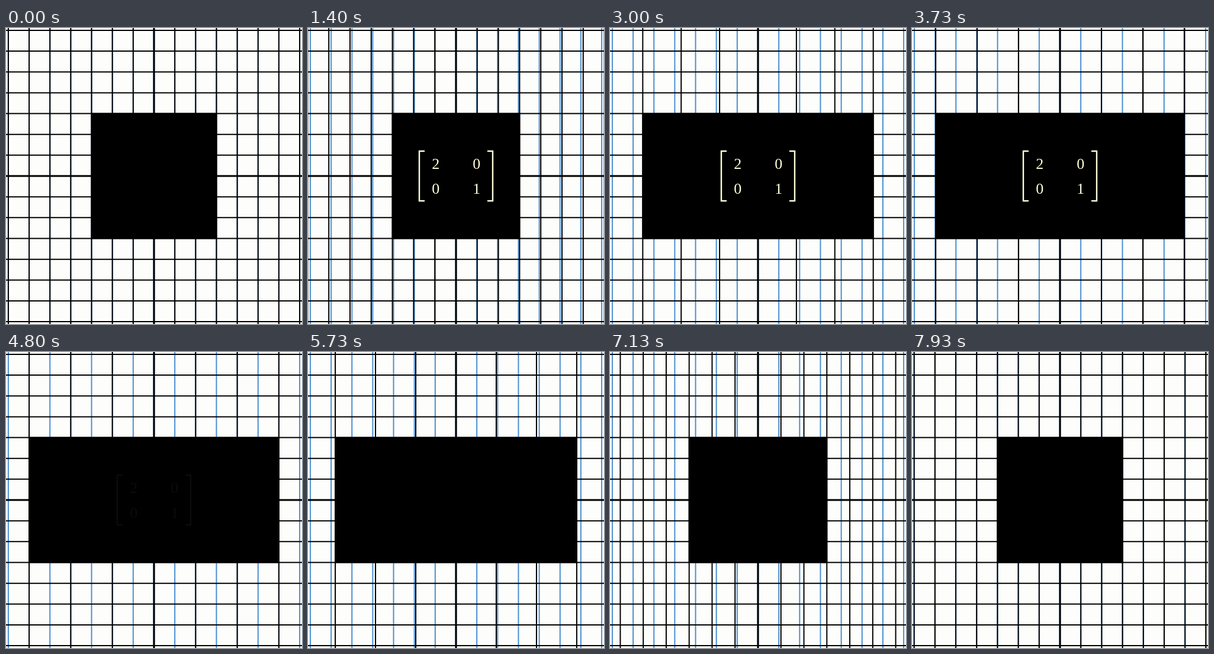
These frames come from a looping animation (500 px wide and 500 px high, 8 s). An HTML page with a canvas:

```html
<!DOCTYPE html>
<html lang="en">
<head>
<meta charset="utf-8">
<title>Horizontal stretch</title>
<style>
html, body { margin: 0; height: 100%; overflow: hidden; background: #fdfdfb; }
canvas { display: block; }
</style>
</head>
<body>
<canvas id="stage" width="500" height="500"></canvas>
<script>
const ctx = document.getElementById('stage').getContext('2d');
const SIZE = 500, MID = SIZE / 2, UNIT = SIZE * 9 / 128;
const LOOP = 8000, FPS = 15;
const PAPER = '#fdfdfb', BLUE = '#4a8fd0', INK = '#000', CREAM = '#ffffd8';

// Normalised logistic easing, clamped to 0..1
const logistic = x => 1 / (1 + Math.exp(-x));
const EDGE = logistic(-5);
function smooth(t) {
  const p = (logistic(10 * (t - 0.5)) - EDGE) / (1 - 2 * EDGE);
  return Math.min(1, Math.max(0, p));
}
const ramp = (time, start, length) =>
  smooth(Math.min(1, Math.max(0, (time - start) / length)));

function line(points, color, width) {
  ctx.strokeStyle = color;
  ctx.lineWidth = width;
  ctx.beginPath();
  points.forEach(([x, y]) => ctx.lineTo(x, y));
  ctx.stroke();
}

function gridLines(color, stretch, vertical) {
  for (let i = -7; i <= 7; i++) {
    const p = MID + i * UNIT * stretch;
    const ends = vertical ? [[p, 0], [p, SIZE]] : [[0, p], [SIZE, p]];
    line(ends, color, i ? 2 : 3);
  }
}

function drawMatrix(opacity) {
  ctx.globalAlpha = opacity;
  for (const side of [-1, 1]) {
    const outer = MID + side * 62, inner = MID + side * 53;
    line([[inner, 208], [outer, 208], [outer, 292], [inner, 292]], CREAM, 2.4);
  }
  ctx.fillStyle = CREAM;
  ctx.font = '26px "Liberation Serif", serif';
  ctx.textAlign = 'center';
  [['2', '0'], ['0', '1']].forEach((row, r) =>
    row.forEach((digit, c) => ctx.fillText(digit, 215.7 + c * 69, 238.3 + r * 42)));
  ctx.globalAlpha = 1;
}

function draw(time) {
  const stretch = 1 + ramp(time, 1000, 3000) - ramp(time, 5000, 3000);
  const opacity = ramp(time, 0, 1000) - ramp(time, 4000, 1000);

  ctx.fillStyle = PAPER;
  ctx.fillRect(0, 0, SIZE, SIZE);
  gridLines(BLUE, 1, true);
  gridLines(INK, stretch, true);
  gridLines(INK, 1, false);

  const halfWidth = 3 * UNIT * stretch + 1, halfHeight = 3 * UNIT + 1;
  ctx.fillStyle = INK;
  ctx.fillRect(MID - halfWidth, MID - halfHeight, 2 * halfWidth, 2 * halfHeight);
  if (opacity > 0) drawMatrix(opacity);
}

function tick() {
  // Hold each step for one frame; the small offset absorbs time rounding
  const step = Math.floor((performance.now() % LOOP + 4) * FPS / 1000);
  draw(step * 1000 / FPS % LOOP);
  requestAnimationFrame(tick);
}
tick();
</script>
</body>
</html>
```
